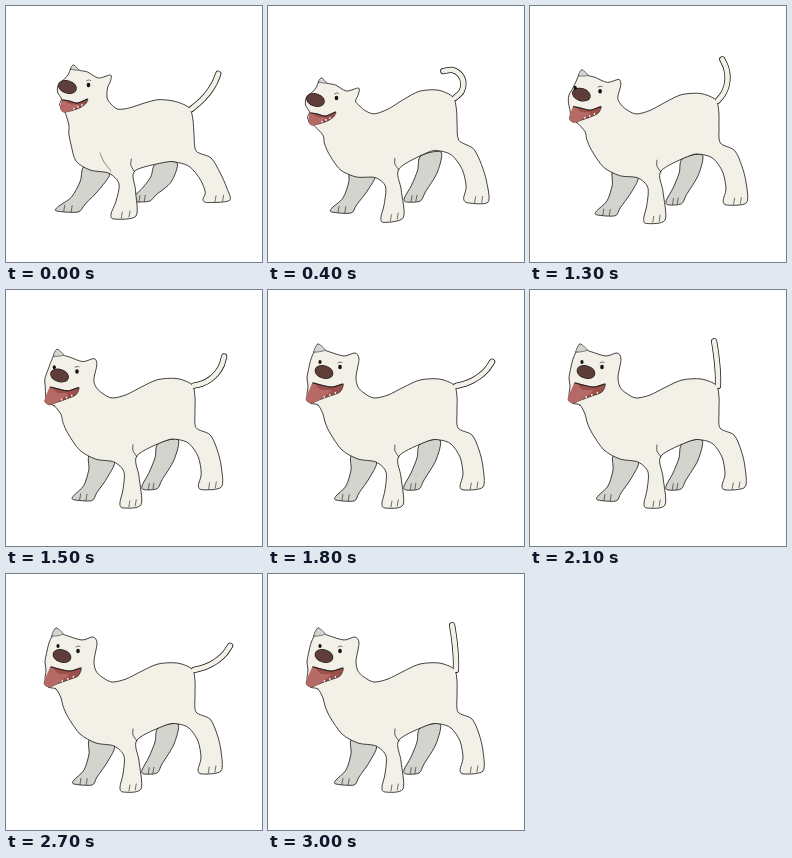
Write an HTML page with a canvas that moves like this. It is 256x256 px and loops after 3100 ms.

```html
<!DOCTYPE html>
<html>
<head>
<meta charset="utf-8">
<style>
html, body { margin: 0; width: 100%; height: 100%; overflow: hidden; background: #fff; }
canvas { display: block; width: 256px; height: 256px; }
</style>
</head>
<body>
<canvas id="stage" width="256" height="256"></canvas>
<script>
const ctx = document.getElementById('stage').getContext('2d');
const LOOP = 3100, STEP = 100, WAG = 900;
const INK = '#141312', CREAM = '#f3f0e7', GRAY = '#d2d4cd';

const points = text => text.split(' ').map(pair => pair.split(',').map(Number));

// The relaxed dog; every other stance is a warp of it.
const body = points('90,97 96,103 106,108 120,105 136,97 152,90 171,89 186,95 189,107 189,122 190,138 204,145 211,160 215,177 215,197 196,200 192,196 195,184 192,167 183,154 172,150 160,151 131,166 133,187 135,215 117,218 114,213 117,200 118,182 108,172 90,169 74,160 62,143 57,132 55,124');
const foreleg = points('84,165 83,180 78,196 68,206 68,210 86,211 91,203 102,187 108,171');
const hindleg = points('152,154 149,168 143,183 136,196 138,200 151,199 156,190 168,170 172,150');
const shoulder = points('127,155 127,161 131,167');

// Head parts are relative to the nose, facing the viewer and in profile.
const head = {
  front: points('-6,33 -14,31 -17,24 -16,14 -17,6 -15,-5 -13,-13 -10,-20 -6,-28 1,-22 6,-20 20,-16 31,-19 35,-13 32,5'),
  side: points('-3,24 -8,18 -6,12 -10,5 -9,-3 -3,-8 1,-13 3,-18 6,-22 11,-17 20,-15 31,-9 43,-12 43,-6 40,1')
};
const mouth = {
  front: points('-11,11 -3,13 8,15 19,12 16,20 6,24 -5,28 -13,31 -18,27 -13,18'),
  side: points('-5,13 2,14 10,16 20,12 18,17 12,21 3,24 -4,25 -7,21 -5,17')
};
const eyes = { front: points('16,-5 -4,-10'), side: points('21,-2 -8,-4') };

const blend = (a, b, k) => a + (b - a) * k;
const mix = (p, q, k) => [blend(p[0], q[0], k), blend(p[1], q[1], k)];

function ramp(v, from, to) {
  const k = Math.max(0, Math.min(1, (v - from) / (to - from)));
  return k * k * (3 - 2 * k);
}

// Wide stance: feet apart, rump low, chest high.
function spread([x, y], pivot) {
  const neck = 5 * (1 - ramp(x, 80, 130)) * (1 - ramp(y, 140, 170));
  const rump = 12 * ramp(x, 100, 180) * (1 - ramp(y, 165, 210));
  return [(x - pivot) * (y - 135) / 400 + neck, rump - 5];
}

// Crouch: chest sinks while the back arches.
const crouchShift = ([x, y], lift) =>
  [(x - 130) * (y - 120) / 1300, lift || -5 * Math.sin((x - 105) / 37)];

// Smooth curve through all points.
function curve(pts, closed) {
  const n = pts.length;
  const at = i => closed ? pts[(i + n) % n] : pts[Math.max(0, Math.min(n - 1, i))];
  ctx.beginPath();
  ctx.moveTo(...pts[0]);
  for (let i = 0; i < (closed ? n : n - 1); i++) {
    const [a, b, c, d] = [at(i - 1), at(i), at(i + 1), at(i + 2)];
    ctx.bezierCurveTo(
      b[0] + (c[0] - a[0]) / 7, b[1] + (c[1] - a[1]) / 7,
      c[0] - (d[0] - b[0]) / 7, c[1] - (d[1] - b[1]) / 7, c[0], c[1]);
  }
  if (closed) ctx.closePath();
}

function line(pts, color = INK, width = 0.8) {
  curve(pts, false);
  ctx.strokeStyle = color;
  ctx.lineWidth = width;
  ctx.stroke();
}

function shape(pts, fill, width = 0.8) {
  curve(pts, true);
  ctx.fillStyle = fill;
  ctx.fill();
  ctx.strokeStyle = INK;
  ctx.lineWidth = width;
  if (width) ctx.stroke();
}

function oval([x, y], rx, ry, fill, tilt = 0) {
  ctx.beginPath();
  ctx.ellipse(x, y, rx, ry, tilt, 0, 7);
  ctx.fillStyle = fill;
  ctx.fill();
}

function toes(a, b) {
  for (const k of [0.33, 0.68]) {
    const [x, y] = mix(a, b, k);
    line([[x, y], [x + 1, y - 6]], INK, 0.6);
  }
}

// The tail bends segment by segment; its tip trails the base.
function tailFrom([x, y], t, calm, bow) {
  const pts = [[x, y]];
  for (let i = 0; i < 5; i++) {
    const u = i / 4;
    const wave = 0.5 + 0.5 * Math.cos(2 * Math.PI * (t - 3000 - 80 * u) / WAG);
    const up = wave ** 1.6;
    const base = 5 + 85 * up * (1 - 0.8 * bow);
    const tip = 55 + 50 * up * (1 + 1.4 * bow ** 4);
    const angle = (blend(base, tip, u) + 25 * (1 - calm) * (1 - u / 2)) * Math.PI / 180;
    x += 9 * Math.cos(angle);
    y -= 9 * Math.sin(angle);
    pts.push([x, y]);
  }
  return pts;
}

function draw(t) {
  ctx.fillStyle = '#fff';
  ctx.fillRect(0, 0, 256, 256);
  ctx.lineCap = ctx.lineJoin = 'round';

  const start = 1 - ramp(t, 0, 400);
  const calm = ramp(t, 600, 1700);
  const crouch = (1 - start) * (1 - calm);
  const bow = Math.sqrt(crouch), turn = Math.sqrt(1 - calm);

  const warp = (pts, pivot = 160, lift = 0) => pts.map(p => {
    const s = spread(p, pivot), c = crouchShift(p, lift);
    return p.map((v, i) => v + s[i] * start + c[i] * crouch);
  });
  const nose = [56 + 5.5 * start - 8.5 * bow, 82 - start + 12 * bow];
  const face = part => part.front.map((p, i) => mix(p, part.side[i], turn).map((v, j) => v + nose[j]));

  const farFore = warp(foreleg, 160, -4), farHind = warp(hindleg, 200, -4);
  for (const leg of [farHind, farFore]) {
    shape(leg, GRAY);
    toes(leg[4], leg[5]);
  }

  const torso = warp(body), skull = face(head);
  const tail = tailFrom([torso[7][0] + 2, torso[7][1] + 1], t, calm, bow);
  line(tail, INK, 6.2);
  shape([...skull, ...torso], CREAM);
  line(tail, CREAM, 4.7);
  shape(skull.slice(7, 10), GRAY, 0.5);
  toes(torso[15], torso[14]);
  toes(torso[25], torso[24]);
  line(warp(shoulder), INK, 0.7);
  if (start > 0.5) line([[94, 147], [98, 156], [105, 165]], '#6b5750', 0.7);

  const lips = face(mouth);
  shape(lips, '#9c4f4b', 0.6);
  shape([lips[0], mix(lips[1], lips[6], 0.3), mix(lips[2], lips[5], 0.4), ...lips.slice(6, 9)], '#b66a66', 0);
  for (const k of [0.2, 0.5, 0.8]) {
    oval(mix(mix(lips[4], lips[6], k), lips[2], 0.12), 0.8, 1.1, '#f4efe8');
  }
  line(lips.slice(0, 4));

  oval(nose, 9.6, 6.6, INK, 0.3);
  oval(nose, 9, 6, '#5f3e3a', 0.3);
  const [eye, farEye] = face(eyes);
  oval(eye, 1.8, 2.2, INK);
  line([[eye[0] - 2, eye[1] - 4], [eye[0], eye[1] - 5], [eye[0] + 2, eye[1] - 4.5]], INK, 0.6);
  if (turn < 0.85) oval(farEye, 1.6, 2.1, INK);
}

function frame() {
  draw(Math.floor(performance.now() % LOOP / STEP) * STEP);
  requestAnimationFrame(frame);
}
frame();
</script>
</body>
</html>
```
